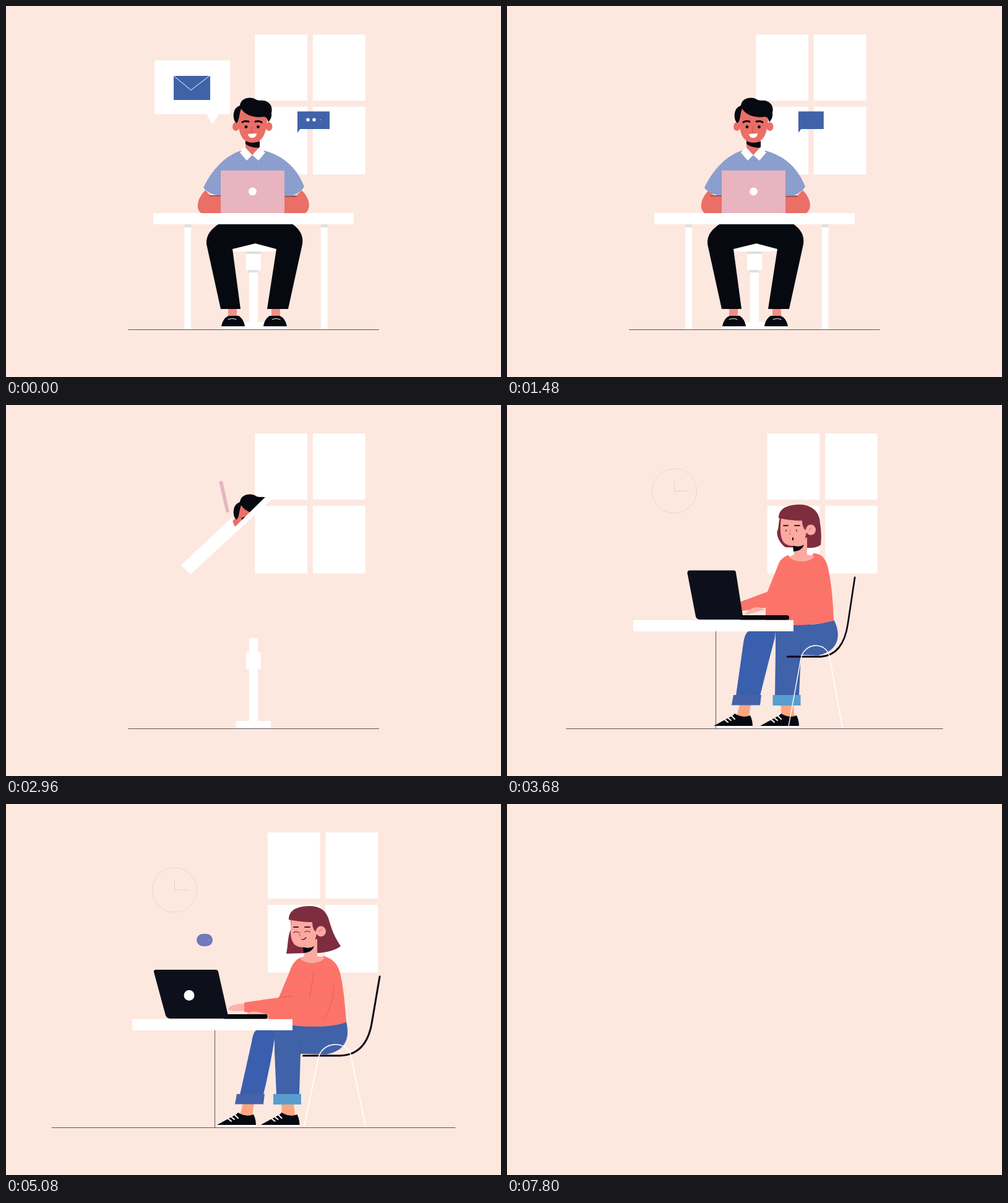
An HTML page that plays this animation: 800 px wide and 600 px high, repeating every 8000 ms.

```html
<!DOCTYPE html>
<html lang="en">
<head>
<meta charset="utf-8">
<title>Remote work</title>
<style>
html, body { margin: 0; height: 100%; overflow: hidden; background: #fde8e0; }
svg { display: block; width: 100vw; height: 100vh; }
text { font: 300 64px Lato, sans-serif; letter-spacing: 9.6px; fill: #15151f; }
</style>
</head>
<body>
<svg viewBox="0 0 800 600">
  <defs>
    <pattern id="knit" width="8" height="8" patternUnits="userSpaceOnUse">
      <path d="M0 4H8" stroke="#f0796a" stroke-width="1.5"/>
    </pattern>
    <pattern id="weave" width="4" height="4" patternUnits="userSpaceOnUse">
      <path d="M0 2H4M2 0V4" stroke="#7d91c6" stroke-width=".5"/>
    </pattern>
  </defs>
  <g id="stage"></g>
</svg>
<script>
const LOOP = 8000, STEP = 40;
const stage = document.getElementById('stage');
const INK = '#06090f', BLUE = '#4062a8', WHITE = '#fff', GREY = '#dfe0dc', LINE = '#5f5254';

// Timing
const span = (t, a, b) => Math.min(1, Math.max(0, (t - a) / (b - a)));
const smooth = u => u < .5 ? 2 * u * u : 1 - 2 * (1 - u) ** 2;
const ease = (t, a, b) => smooth(span(t, a, b));
const pop = (t, a, b) => 1 - (1 - span(t, a, b)) ** 3;
const lerp = (a, b, k) => a + (b - a) * k;

// Blends two paths with the same commands
const blend = (a, b, k) => {
  const to = b.match(/-?[\d.]+/g);
  let i = 0;
  return a.replace(/-?[\d.]+/g, n => lerp(+n, +to[i++], k).toFixed(2));
};

// Drawing
const fill = (d, color) => `<path d="${d}" fill="${color}"/>`;
const line = (d, color, w = 1) =>
  `<path d="${d}" fill="none" stroke="${color}" stroke-width="${w}" stroke-linecap="round" stroke-linejoin="round"/>`;
const rect = (x, y, x2, y2, color, r = 0) => x2 <= x || y2 <= y ? '' :
  `<rect x="${x}" y="${y}" width="${x2 - x}" height="${y2 - y}" rx="${r}" fill="${color}"/>`;
const oval = (x, y, rx, ry, color) => `<ellipse cx="${x}" cy="${y}" rx="${rx}" ry="${ry}" fill="${color}"/>`;
const dot = (x, y, r, color) => oval(x, y, r, r, color);
const move = (x, y, body) => `<g transform="translate(${x} ${y})">${body}</g>`;
const scale = (x, y, sx, sy, body) => sx < .005 || sy < .005 ? '' :
  `<g transform="translate(${x} ${y}) scale(${sx} ${sy}) translate(${-x} ${-y})">${body}</g>`;

function room(t) {
  const shift = 20.5 * ease(t, 3160, 3840);
  const wide = ease(t, 3160, 3900);
  const left = 1 - ease(t, 5560, 6000);
  const half = lerp(202.5, 326, wide) * left;
  let panes = '';
  for (const [x, y, h] of [[402.5, 46, 107], [496, 46, 107], [402.5, 163, 109.5], [496, 163, 109.5]])
    panes += scale(x + 42, y + h, left, left, rect(x, y, x + 84.5, y + h, WHITE));
  return move(shift, 0, panes) +
    (half > 1 ? line(`M${400 - half} 523.5H${400 + half}`, LINE) : '');
}

function mail(t) {
  const s = 1 - ease(t, 880, 1240);
  return scale(334, 190, s, s,
    rect(240, 88, 362, 175, WHITE) + fill('M324 174L331 188Q333 192 336 188L344 174Z', WHITE) +
    rect(271, 113, 330, 152, BLUE) + line('M271 113L299 136L329 113', WHITE));
}

function chat(t) {
  const w = 52 * (1 - span(t, 1400, 1640) ** 1.4);
  if (w < 1) return '';
  const dots = [488, 498, 508].map((x, i) => {
    const r = 2.7 * span(t, i < 2 ? -1 : -40, i < 2 ? 0 : 120) * (1 - span(t, 1120 + i * 80, 1240 + i * 80));
    return dot(x, 184, r, WHITE);
  }).join('');
  return rect(471, 170.5, 471 + w, 199, BLUE) + fill('M471 198V205L476 198Z', BLUE) + dots;
}

function stool(t) {
  const seat = 1 - ease(t, 2640, 2880);
  return scale(400, 523, 1, 1 - ease(t, 2960, 3200),
    rect(393, 377, 407, 512, WHITE) + rect(388, 400, 412, 427, WHITE) + rect(372, 511, 428, 523, WHITE) +
    scale(400, 397, seat, 1, fill('M366 393L403 384L436 393V397H366Z', WHITE) +
      rect(388, 397, 412, 401, GREY) + rect(392, 427, 407, 431, GREY)));
}

function manHead(t) {
  const off = lerp(110, 0, span(t, 2800, 2960)) - 90 * span(t, 2960, 3120);
  const clip = t > 2780
    ? `<clipPath id="cut"><path d="M300 ${266 + off}L500 ${70 + off}V50H300Z"/></clipPath><g clip-path="url(#cut)">` : '<g>';
  const skin = '#ea6f67';
  return clip + move(0, -4 * ease(t, 2600, 2960),
    oval(371.5, 195, 5.5, 7, skin) + oval(425, 195, 5.5, 7, skin) +
    fill('M375 165C373 206 381 221 398 221C414 221 420 208 422 186L420 165Z', skin) +
    fill('M372 189C366 184 365 165 378 161C379 151 390 146 402 150C408 155 414 151 420 154C428 157 431 164 429 173C430 180 427 184 424 188C422 183 422 180 417 179C405 181 388 179 380 166C377 174 377 182 374 189Z', INK) +
    line('M382 188Q386 185 392 187M403 187Q409 185 413 188', INK, 3) +
    dot(388, 195.5, 2.4, INK) + dot(407.5, 195.5, 2.4, INK) + line('M398 195L396 204H399', '#c9514f') +
    fill('M391 207L405 206C405 215 392 216 391 207Z', WHITE)) + '</g>';
}

function man(t) {
  if (t > 3200) return '';
  const skin = '#ea6f67';
  const bob = period => 2 - 2 * Math.cos(2 * Math.PI * t / period);
  const legs = 1 - ease(t, 2520, 2840), body = 1 - ease(t, 2600, 2900);
  const shoe = fill('M348 518C350 508 355 502 361 501H376C382 505 385 511 386 518Z', INK) +
    rect(348, 518, 386, 522, WHITE) + line('M359 507Q366 504 372 507', WHITE);
  const foot = rect(359, 486, 373, 503, '#f58e84') + shoe;
  const lower = foot + `<g transform="translate(802 0) scale(-1 1)">${foot}</g>` +
    fill('M345 352H462C475 361 481 371 479 385L456 490H422L437 393L403 384L366 393L379 490H347L324 385C323 370 332 360 345 352Z', INK);
  const shirt = 'M380 234C352 242 330 270 319 294C326 303 338 306 347 307H450C462 308 475 304 482 292C472 268 456 245 418 234Z';
  const torso =
    move(bob(423), 0, fill('M322 298C308 312 306 330 316 335H349V306H330Z', skin)) +
    move(-bob(370), 0, fill('M478 298C492 312 493 328 484 335H448V306H470Z', skin)) +
    fill(shirt, '#91a3d0') + fill(shirt, 'url(#weave)') +
    line('M329 307H347M451 308H469', '#5a3a48') +
    fill('M387 214H410V230L398 243L387 230Z', skin) +
    fill('M387 216Q398 222 410 219V229Q396 230 387 223Z', INK) +
    fill('M386 228L398 241L389 250L378 237ZM410 228L398 241L408 250L419 237Z', WHITE);

  const fly = Math.min(1, ease(t, 2520, 3000) / smooth(440 / 480));
  const out = 1 - span(t, 2960, 3120);
  const top = blend('M238 335L400 335L410 335L562 335L562 353L238 353Z',
    'M283 259L364 183L370 197L418 150L430 152L298 274Z', fly);
  const screen = blend('M347 266L450 266L450 335L347 335Z', 'M344 124L350 122.5L361 173L356 174.5Z', fly);
  const posts = 1 - ease(t, 2440, 2700);
  const post = x => scale(x, 523, 1, posts, rect(x, 353, x + 10.5, 523, WHITE) + rect(x, 353, x + 10.5, 358, GREY));
  return stool(t) + scale(400, 523, legs, legs, lower) + scale(400, 335, body, body, torso) + manHead(t) +
    post(288.5) + post(509) +
    scale(352, 150, out, out, fill(screen, '#e8b4bf') + dot(398.5, 300 - 140 * fly, 6.5 * Math.max(0, 1 - fly * 1.4), WHITE)) +
    scale(425, 152, out, out, fill(top, WHITE));
}

function womanHead(k) {
  const skin = '#fba9a1', hair = '#7e2d3f';
  const back = blend(
    'M460 188C468 163 516 158 523 191C528 208 533 218 541 230C530 238 512 242 490 241L453 242C456 228 455 215 460 203Z',
    'M440 186C450 160 498 152 505 184C507 198 509 210 507 226C500 232 490 231 475 231L450 230C438 222 434 206 438 201Z', k);
  const eyes = k > .4
    ? line('M469 206V208M486 206V208', INK, 1.2) + line('M480 219V222', INK, 2)
    : line('M465 208Q469 205 473 208M483 207Q487 204 491 207', '#4a2030', 1.2) + line('M478 219Q482 220 485 216', '#4a2030', 1.3);
  return fill(back, hair) + move(-18 * k, -4 * k,
    fill('M482 226L503 218V246L515 248C510 260 481 260 475 249L482 246Z', skin) +
    fill('M480 231Q489 235 498 230Q495 240 481 241Z', INK) +
    fill('M461 186C459 205 459 219 466 227C474 234 490 234 499 222L507 190Z', skin) +
    fill('M457 187C457 169 475 165 492 165C516 166 524 182 522 203L503 205C499 209 495 200 495 191C480 191 468 189 457 187Z', hair) +
    oval(509, 206, 8, 8.5, skin) + line('M506 207Q508 202 511 203', '#d8716f') +
    line('M465 199H472M483 199H491', '#40182a', 1.8) + line('M476 206L474 213H477', '#d8716f') + eyes);
}

function woman(t) {
  if (t < 3160 || t > 6040) return '';
  const k = t < 3680 ? 1 : 1 - pop(t, 3680, 4080);
  const grow = (a, b, out) => pop(t, a, b) * (1 - ease(t, out, out + 360));
  const sweater = blend(
    'M477 248C467 252 462 260 458 272L441 313L385 321L385 336C400 339 415 340 424 341L424 350L463 358C495 362 530 360 550 353C548 322 544 288 540 274C536 256 524 248 512 246C508 260 482 260 477 248Z',
    'M455 243C445 246 440 252 437 262L421 302L378 318L378 333C395 331 410 328 418 328L418 348L440 355C470 358 510 354 528 349C527 310 522 272 517 257C512 244 505 240 495 240C488 256 462 256 455 243Z', k);
  const shin = blend('M404 366L434 366L434 379Q428 420 416 470L378 470L397 385Q399 370 404 366Z',
    'M390 366L434 366L433 376Q424 410 409 470L370 470L382 385Q384 370 390 366Z', k);
  const hip = blend('M434 366L463 356C500 362 530 360 550 352C555 374 553 398 518 405L476 404L474 470L437 470L434 400Z',
    'M434 366L463 352C490 358 510 354 528 347C538 365 542 396 503 405L475 404L472 470L433 470L434 400Z', k);
  const screen = blend('M243 268L339 268Q342 268 343 271L360 347L266 347Q260 347 258 342L239 272Q238 268 243 268Z',
    'M295 267.5L367 267.5Q370 268 370 271L382 347L313 347Q306 347 305 342L291.5 272Q291 268 295 267.5Z', k);
  const tap = Math.sin(t / 60) * (1 - k);
  const hands = fill('M388 323C372 322 360 326 359 332C364 336 380 335 388 334Z', '#fcb3ab');
  const shoe = fill('M341 519L372 502L375 499Q388 507 400 502Q404 510 404 519Z', INK) + rect(341, 519, 404, 523, WHITE) +
    line('M359 509L364 513M364 506L369 510M370 503L375 508', WHITE, 2);
  const legs =
    move(-7 * k, 0, fill('M383 484H401L398 504H378Z', '#fea680') + shoe) +
    move(-2.5 * k, 0, fill('M445 484H465L467 504H446Z', '#fea680') + move(70.5, 0, shoe)) +
    fill(shin, '#3a5fae') + fill(hip, BLUE) +
    line(`M${476 - k * 2} 388V404`, '#34528f') +
    move(-7 * k, 0, fill('M373 469H418L416 485.5H370Z', '#4562a9')) +
    move(-2.5 * k, 0, fill('M432 469H477V486H432Z', '#599dd0'));
  const chair = move(-27 * k, 0, scale(480, 523, 1 - .12 * k, 1,
    line('M480.5 407H540C573 406 586 383 591 355L604 279', '#0b0713', 3) +
    line('M482 521L505 410C511 384 549 382 557 405L581 521', WHITE, 1.6)));
  const torso = move(0, tap, k < .5 ? hands : '') + fill(sweater, '#fe7269') + fill(sweater, 'url(#knit)') +
    move(-26 * k, 0, k < .5 ? line('M497 273L491 312M530 293Q528 330 512 351M441 313L463 311', '#e45f5b') : '') +
    fill(blend('M388 340Q398 331 420 340Z', 'M384 340Q398 320 417 331Z', k), '#fcb3ab');
  const laptop = rect(lerp(350, 375, k), 340, lerp(423, 456, k), 347.5, INK, 3.5) + fill(screen, '#0d101a') +
    dot(296, 309.5, 8.5 * (1 - k), WHITE);
  const clock = move(-2 * k, 0,
    '<circle cx="272.5" cy="139" r="36" fill="none" stroke="#f6d0c7"/>' + line('M272.5 124V139H296', '#f4c8be'));
  const c = grow(3240, 3520, 5600), b = grow(3280, 3600, 5560), d = grow(3160, 3480, 5640);
  const h = grow(3360, 3660, 5500), l = grow(3320, 3640, 5480);
  return scale(272, 139, c, c, clock) + scale(430, 523, b, b, legs) + scale(500, 355, h, h, torso) +
    scale(490, 300, h, h, womanHead(k)) + scale(520, 523, c, c, chair) + scale(360, 348, l, l, laptop) +
    scale(337, 523, 1, d, line('M337.5 366V523', LINE)) +
    scale(337, 357, d, 1, rect(204, 348, 463, 366, WHITE)) + reply(t);
}

function reply(t) {
  const s = pop(t, 4120, 4360) * (1 - ease(t, 5000, 5160));
  const dots = [314, 321, 328].map((x, i) => dot(x, 220,
    2.7 * span(t, 4360 + i * 120, 4480 + i * 120) * (1 - span(t, 4880 + i * 60, 4980 + i * 60)), WHITE)).join('');
  return s < .02 ? '' : rect(321 - 26 * s, 220 - 20 * s, 321 + 26 * s, 220 + 20 * s, '#6f79bd', 20 * s) + dots;
}

function title(t) {
  const typed = Math.floor((t - 6080) / STEP) + 1;
  const kept = Math.floor((7800 - t) / STEP);
  const n = Math.max(0, Math.min(typed, kept, 11));
  return n ? `<text x="115" y="293">${'REMOTE WORK'.slice(0, n)}</text>` : '';
}

function render(now) {
  const t = Math.floor(now % LOOP / STEP) * STEP;
  stage.innerHTML = room(t) + mail(t) + chat(t) + man(t) + woman(t) + title(t);
}

const start = performance.now();
function tick() {
  render(performance.now() - start);
  requestAnimationFrame(tick);
}
tick();
</script>
</body>
</html>
```
